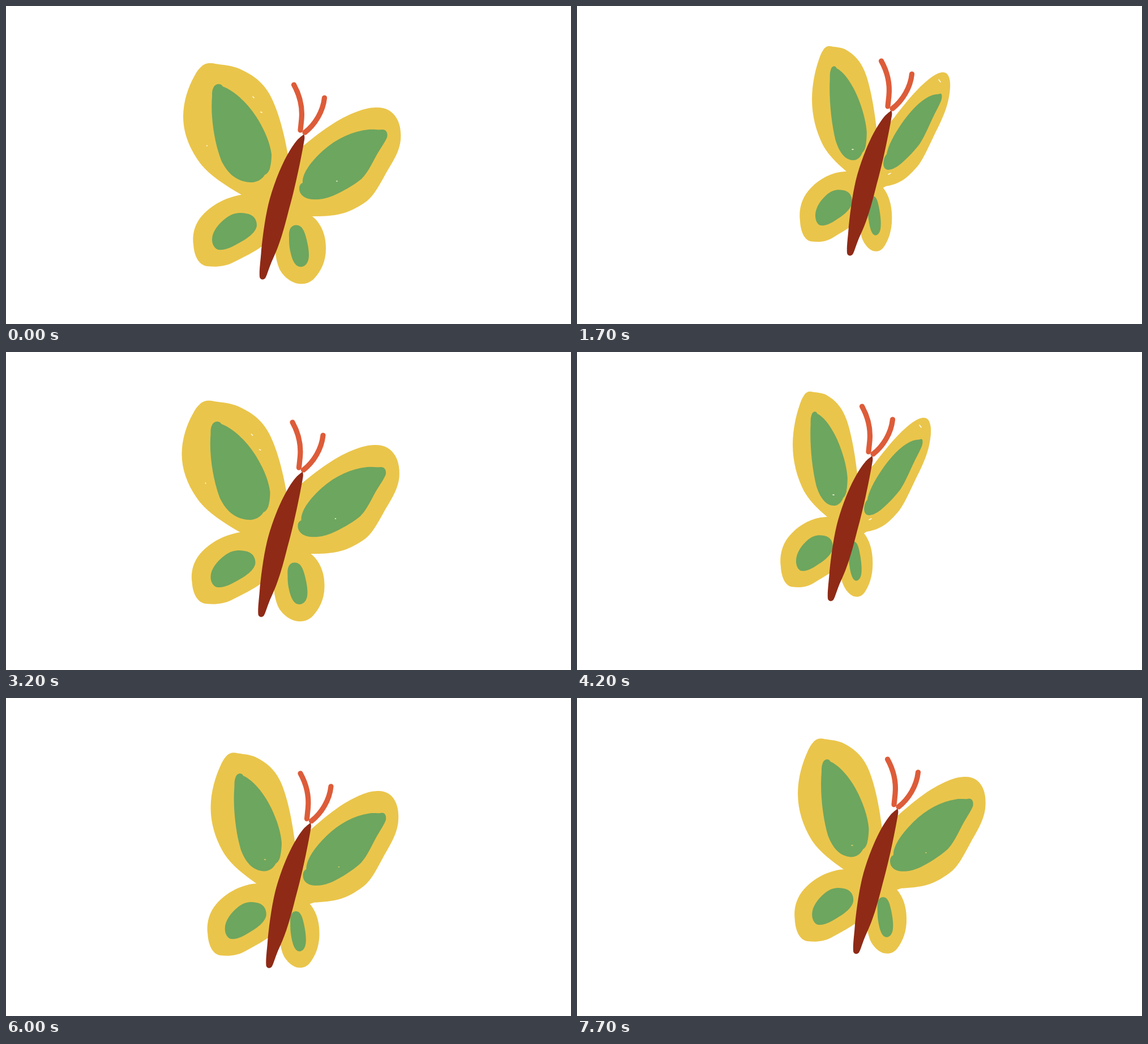
Recreate the animation shown at these times as an HTML page. Size 998x561 px, loop 7.9 s.

```html
<!DOCTYPE html>
<html lang="en">
<head>
<meta charset="utf-8">
<title>Butterfly</title>
<style>
  html, body { margin: 0; width: 100%; height: 100%; overflow: hidden; background: #fff; }
  svg { display: block; width: 100%; height: 100%; }
  .wing { fill: #eac54b; }
  .patch { fill: #6da65f; }
  .body { fill: #8f2a16; }
  .feeler { fill: none; stroke: #dd5c39; stroke-width: 9.2; stroke-linecap: round; }
</style>
</head>
<body>
<svg viewBox="0 0 998 561">
  <g id="fly">
    <g id="wings" class="wing"></g>
    <g id="patches" class="patch"></g>
    <g id="specks"></g>
    <path class="feeler" d="M508.500 139C518 156 524 178 522 200L520 219"/>
    <path class="feeler" d="M562.500 162C560 186 546 209 528 223"/>
    <path class="body" d="M524 228C527 224 528 230 527 236C522 265 512 315 500 358C490 398 482 424 472 445C464 462 462 473 458 480C455 484 449 483 448 478C447 466 450 447 451 430C454 400 459 365 466 340C478 298 495 262 510 242C516 234 520 231 524 228Z"/>
  </g>
</svg>
<script>
const NS = 'http://www.w3.org/2000/svg';
const LOOP = 7900, TICK = 100, DRAWING = 110, CYCLE = 36;
const $ = id => document.getElementById(id);

function add(parent, tag, attrs) {
  const el = document.createElementNS(NS, tag);
  for (const key in attrs) el.setAttribute(key, attrs[key]);
  return parent.appendChild(el);
}

// Open-wing outlines; "half" and "shut" fold them towards the body.
const parts = [
  {
    wing: 'M345 107C352 100 362 100 370 102C385 104 396 105 408 109C435 120 451 133 462 150C477 172 490 217 497 257L505 300L450 350L416 333C385 315 362 300 345 280C325 254 313 225 313 195C313 168 322 143 332 125C336 117 340 111 345 107Z',
    patch: 'M366 145C369 136 380 136 383 142C405 150 430 175 445 200C460 225 467 245 469 262C469 275 467 283 466 287C463 295 459 297 457 298C451 308 440 312 430 311C405 309 390 293 380 272C368 240 361 195 364 160C364 153 364 149 366 145Z',
    half: [.81, -.02, -.015, 1, 99.5, 9],
    shut: [.62, -.05, 0, .974, 192, 32.7]
  },
  {
    wing: 'M416 333C390 337 365 350 348 368C332 385 329 405 331 420C332 440 340 457 355 459C372 461 388 459 400 453C420 443 440 433 452 424L480 400L480 325L450 330Z',
    patch: 'M364 412C364 398 375 384 390 373C402 365 412 364 424 366C438 368 443 377 443 387C442 400 425 411 410 419C396 427 386 431 375 430C368 428 364 420 364 412Z',
    half: [.925, 0, 0, 1, 38.5, 1],
    shut: [.823, 0, 0, .97, 92.4, 12]
  },
  {
    wing: 'M526 246C545 230 575 207 600 195C625 183 640 179 655 179C672 179 683 186 690 198C697 210 698 224 697 237C694 262 679 280 668 301C656 322 647 339 632 348C618 357 606 363 594 366C575 371 556 371 541 371L490 385L490 270Z',
    patch: 'M524 312C523 296 537 276 560 255C585 233 612 221 640 218C650 217 658 219 664 218C672 217 675 225 673 232C668 243 660 253 653 266C645 281 638 295 628 305C612 318 593 328 577 335C562 341 550 342 540 341C528 340 518 333 518 322C518 316 521 313 524 312Z',
    half: [.925, -.04, -.03, 1, 43.5, 17.3],
    shut: [.543, -.105, -.19, .985, 292.6, 51.7]
  },
  {
    wing: 'M541 371C555 382 565 402 565 425C566 450 556 468 545 480C537 489 527 491 518 490C505 489 490 478 483 464C479 455 477 445 476 436L480 370Z',
    patch: 'M500 408C499 395 503 386 513 386.500C523 387 527 396 531 412C535 428 536 440 534 448C532 456 526 461 519 460C510 459 505 447 502 432C500 422 500 415 500 408Z',
    half: [.79, 0, 0, .96, 95.7, 11.2],
    shut: [.65, 0, 0, .94, 160, 14]
  }
];

for (const part of parts) {
  part.shapes = [add($('wings'), 'path', { d: part.wing }), add($('patches'), 'path', { d: part.patch })];
  part.poses = [[1, 0, 0, 1, 0, 0], part.half, part.shut].map(m => `matrix(${m})`);
}

// Small gaps in the paint, one set per wing pose.
const specks = [
  'M436 160l2 2M450 187l2 1M355 246v1M584 309h1',
  'M445 291h2M576 304h1',
  'M457 295h2M610 172l3 4M521 339l4 -2'
].map((d, i) => add($('specks'), 'path', {
  d, fill: 'none', stroke: i === 1 ? '#e4d267' : '#fffbe8', 'stroke-width': 1.6, 'stroke-linecap': 'round'
}));

const flap = [0, 1, 2, 1];
const path = [[0, 0], [-2.5, -15], [-5, -43], [-6.3, -58], [6, -53], [29, -42], [40, -31], [30, -21], [11.5, -6]];

function draw(ms) {
  const tick = Math.floor(ms % LOOP / TICK);
  const n = Math.floor(tick * TICK / DRAWING) % CYCLE;
  const step = n < 5 ? n : n - 1; // one drawing is held twice
  const pose = flap[step % flap.length];
  $('fly').setAttribute('transform', `translate(${path[step % path.length]})`);
  for (const { shapes, poses } of parts)
    for (const shape of shapes) shape.setAttribute('transform', poses[pose]);
  specks.forEach((el, i) => el.setAttribute('visibility', i === pose ? 'visible' : 'hidden'));
}

const start = performance.now();
function loop() {
  draw(performance.now() - start);
  requestAnimationFrame(loop);
}
loop();
</script>
</body>
</html>
```
